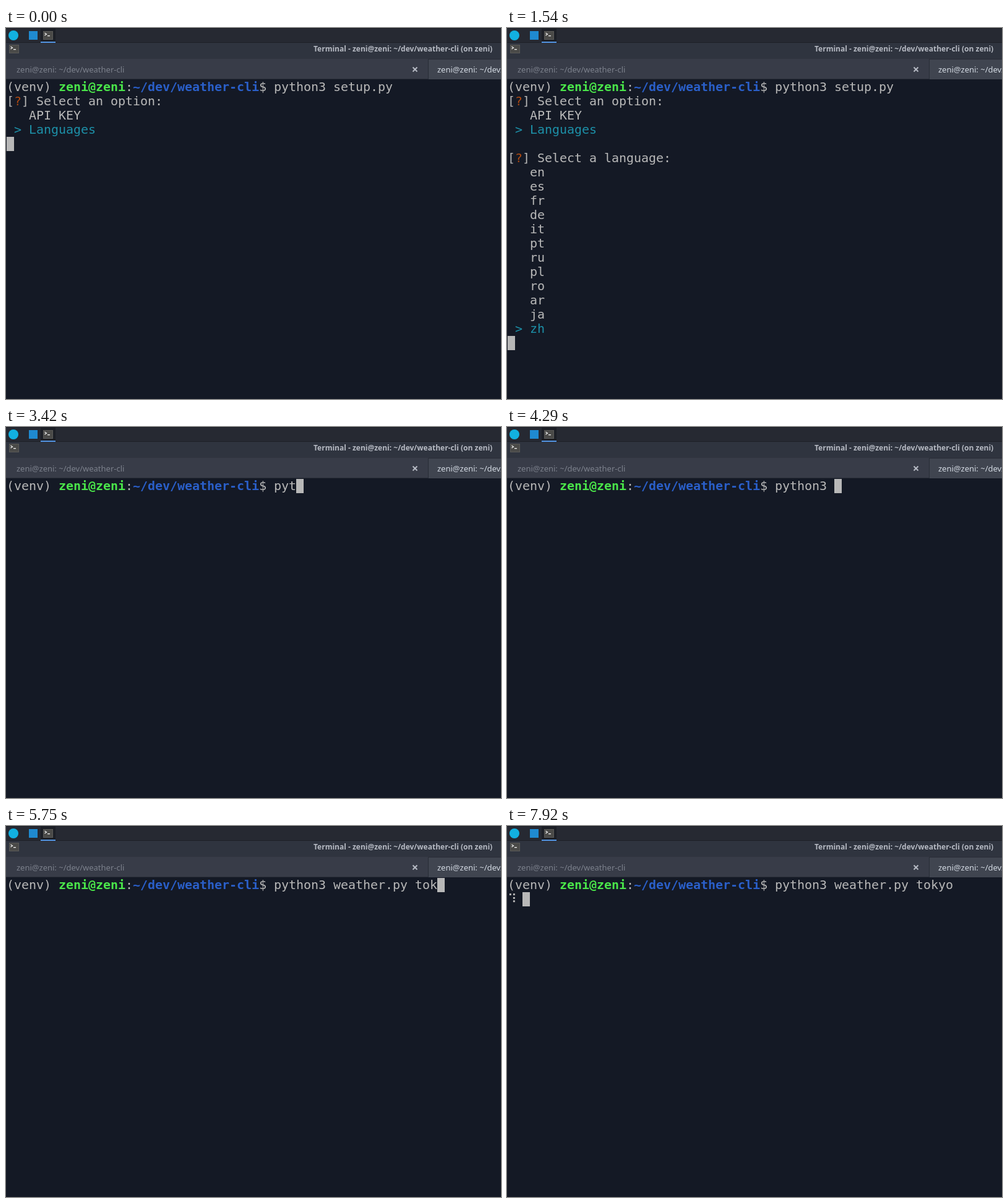
An HTML page with a canvas that plays this animation: 800x600 px, repeating every 8 s.

```html
<!DOCTYPE html>
<html lang="en">
<head>
<meta charset="utf-8">
<title>Terminal</title>
<style>
html, body { margin: 0; width: 100%; height: 100%; overflow: hidden; background: #141925; }
canvas { display: block; }
</style>
</head>
<body>
<canvas id="stage" width="800" height="600"></canvas>
<script>
const ctx = document.getElementById('stage').getContext('2d');
const LOOP = 8000, CW = 12, RH = 23, X0 = 1, Y0 = 84;
const FG = '#b8b8b8', CYAN = '#1d90a8', ORANGE = '#b04a12', GREEN = '#4ae64a', BLUE = '#2a5fc9';
const USER = 'zeni@zeni', PATH = '~/dev/weather-cli';
const LANGS = 'en es fr de it pt ru pl ro ar ja zh'.split(' ');
const CMD = 'python3 weather.py tokyo';
const SPINNER = '⠋⠙⠹⠸⠼⠴⠦⠧⠇⠏';

// [time, value]: the value holds from that time on
const PICKS = [[0, 0], [450, 1], [940, 2], [1040, 4], [1130, 5], [1220, 7], [1310, 9], [1400, 10], [1540, 11], [1850, 10]];
const KEYS = [[0, 0], [3070, 1], [3230, 2], [3420, 3], [3610, 4], [3715, 5], [3820, 6], [4060, 7], [4290, 8],
  [4410, 9], [4560, 10], [4800, 19], [5500, 20], [5590, 21], [5750, 22], [5810, 23], [5890, 24]];
const valueAt = (steps, t) => steps.filter(s => s[0] <= t).pop()[1];

function rect(x, y, w, h, color) {
  ctx.fillStyle = color;
  ctx.fillRect(x, y, w, h);
}

function label(text, x, y, font, color) {
  ctx.font = font + ' "Noto Sans", sans-serif';
  ctx.fillStyle = color;
  ctx.fillText(text, x, y);
}

function line(color, width, ...points) {
  ctx.strokeStyle = color;
  ctx.lineWidth = width;
  ctx.beginPath();
  points.forEach(([x, y]) => ctx.lineTo(x, y));
  ctx.stroke();
}

function termIcon(x, y) {
  rect(x, y, 16, 14, '#5a5a58');
  rect(x + 1, y + 1, 14, 12, '#4a4a48');
  line('#f0f0f0', 1.3, [x + 2.5, y + 3], [x + 5.5, y + 5], [x + 2.5, y + 7]);
  rect(x + 7, y + 7, 4, 1.3, '#f0f0f0');
}

function chrome() {
  rect(0, 0, 800, 24, '#262932');
  rect(0, 0, 800, 1, '#1b1d24');
  rect(56, 1, 24, 22, '#1c1f26');
  rect(56, 22, 24, 2, '#5294e2');
  ctx.fillStyle = '#12b0e0';
  ctx.beginPath();
  ctx.arc(12, 12, 8, 0, 7);
  ctx.fill();
  rect(37, 5, 14, 14, '#1f8ad0');
  termIcon(60, 5);

  rect(0, 24, 800, 24, '#2f343f');
  rect(0, 23, 56, 1, '#1d2027');
  rect(80, 23, 720, 1, '#1d2027');
  termIcon(5, 27);
  label(`Terminal - ${USER}: ${PATH} (on zeni)`, 497, 38, 'bold 12px', '#b6bac3');

  rect(0, 48, 800, 35, '#383c48');
  rect(0, 48, 800, 2, '#30343f');
  rect(682, 50, 118, 33, '#404550');
  rect(682, 50, 1, 33, '#292d37');
  rect(682, 50, 118, 1, '#292d37');
  rect(0, 82, 682, 1, '#292d37');
  label(`${USER}: ${PATH}`, 17, 72, '13px', '#7c818c');
  label(`${USER}: ${PATH}`, 697, 72, '13px', '#d3dae3');
  line('#b6bac3', 2, [657.5, 63.5], [664.5, 70.5]);
  line('#b6bac3', 2, [664.5, 63.5], [657.5, 70.5]);
}

function print(col, row, text, color = FG, weight = '') {
  ctx.font = weight + ' 20px "DejaVu Sans Mono", "DejaVu Sans", monospace';
  ctx.fillStyle = color;
  [...text].forEach((ch, i) => ctx.fillText(ch, X0 + (col + i) * CW, Y0 + row * RH + 18));
}

function cursor(col, row) {
  rect(X0 + col * CW, Y0 + row * RH, CW, RH, FG);
}

function prompt(row, cmd = '') {
  print(0, row, '(venv)');
  print(7, row, USER, GREEN, 'bold');
  print(16, row, ':');
  print(17, row, PATH, BLUE, 'bold');
  print(34, row, '$ ' + cmd);
}

function menu(row, title, items, pick) {
  print(0, row, '[ ] ' + title);
  print(1, row, '?', ORANGE);
  items.forEach((item, i) => {
    const on = i === pick;
    print(1, row + 1 + i, (on ? '> ' : '  ') + item, on ? CYAN : FG);
  });
}

function setup(t) {
  prompt(0, 'python3 setup.py');
  menu(1, 'Select an option:', ['API KEY', 'Languages'], 1);
  if (t < 240) return cursor(0, t < 140 ? 4 : 5);
  menu(5, 'Select a language:', LANGS, valueAt(PICKS, t));
  if (t < 2180) return cursor(0, t < 2100 ? 18 : 19);
  print(0, 19, 'Language preference saved');
  if (t < 2270) return cursor(0, 20);
  prompt(20);
  cursor(36, 20);
}

function weather(t) {
  const typed = valueAt(KEYS, t);
  prompt(0, CMD.slice(0, typed));
  if (t < 6090) return cursor(36 + typed, 0);
  if (t < 7000) return cursor(0, 1);
  const step = Math.floor((t - 7000) * 7 / 720 + 0.01);
  const tick = t < 7720 ? Math.floor(step * 10 / 7) : t < 7830 ? 10 : t < 7920 ? 11 : 12;
  print(0, 1, SPINNER[tick % 10]);
  cursor(2, 1);
}

function frame(now) {
  const t = now % LOOP;
  rect(0, 0, 800, 600, '#141925');
  chrome();
  (t < 2840 ? setup : weather)(t);
  requestAnimationFrame(frame);
}
requestAnimationFrame(frame);
</script>
</body>
</html>
```
